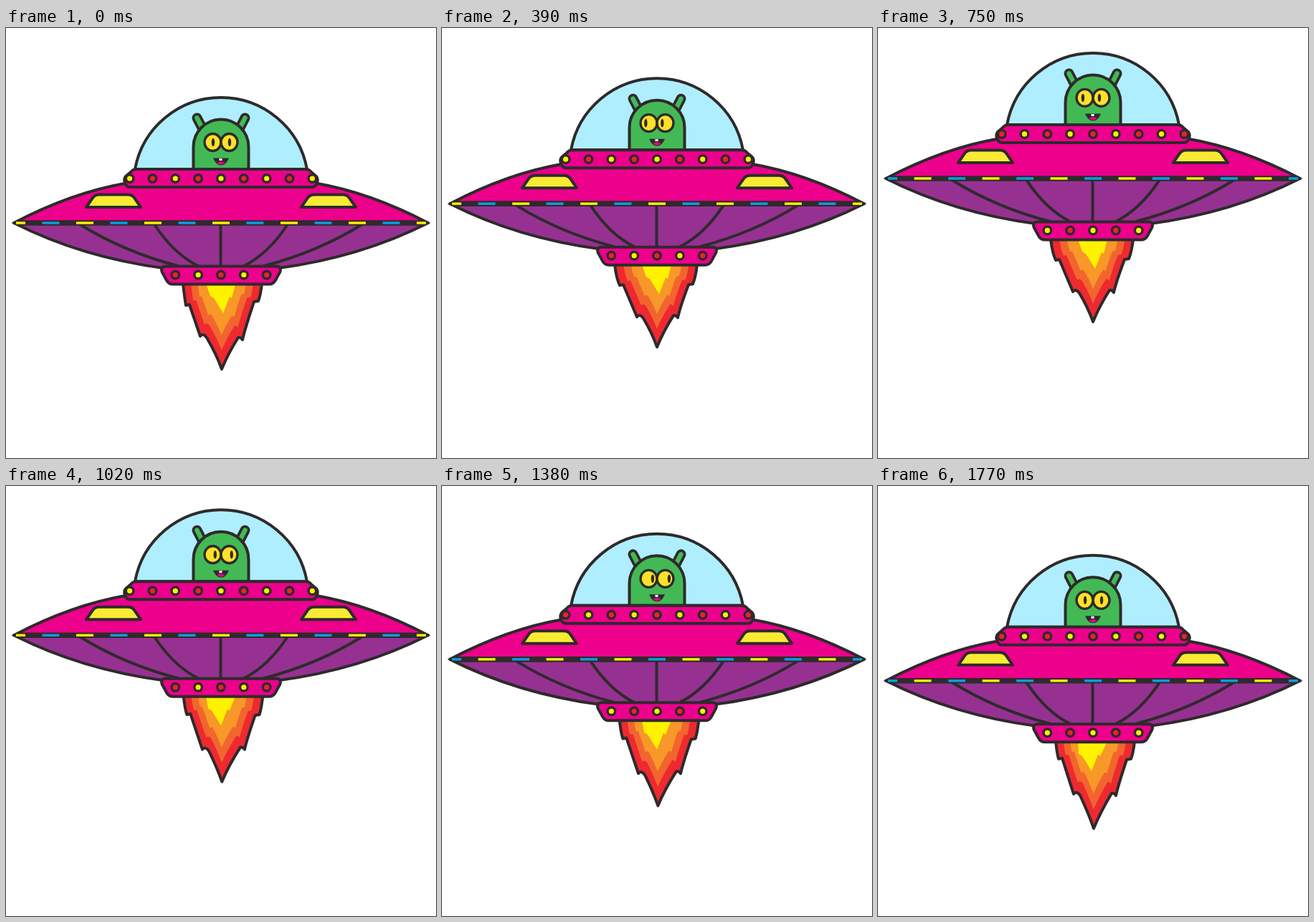
Animation of 600x600 px, one loop 1800 ms. Source, as an HTML page with a canvas:

```html
<!DOCTYPE html>
<html lang="en">
<head>
<meta charset="utf-8">
<title>Flying saucer</title>
<style>
html, body { margin: 0; width: 100%; height: 100%; overflow: hidden; background: #fff; }
canvas { display: block; width: 600px; height: 600px; }
</style>
</head>
<body>
<canvas id="stage" width="600" height="600"></canvas>
<script>
const ctx = document.getElementById('stage').getContext('2d');
const LOOP = 1800, STEP = 30, BLINK = 150, FLICKER = 360;
const INK = '#2e2a2b', PINK = '#ec008c', PURPLE = '#963192', GLASS = '#afeeff',
  GREEN = '#43b955', EYE = '#ffe029', PANE = '#f9eb33', YELLOW = '#fff200',
  RED = '#e9232b', BLUE = '#0a9fe3';

// at, left top, left barb, lower left barb, tip, lower right barb, right barb, right top, core tip
const FLAMES = [
  [0, 247, 251, 387, 271, 430, 301, 476, 330, 435, 352, 381, 357, 303],
  [30, 241, 248, 386, 272, 430, 300, 472, 329, 431, 350, 384, 356, 303],
  [90, 247, 252, 382, 276, 433, 302, 476, 334, 427, 355, 385, 359, 306],
  [150, 239, 245, 381, 277, 424, 301, 478, 330, 427, 352, 380, 356, 303],
  [240, 247, 253, 386, 276, 434, 302, 473, 335, 430, 355, 386, 359, 304],
  [330, 248, 252, 381, 273, 430, 301, 478, 332, 432, 353, 381, 358, 298]
];

const smooth = x => x * x * (3 - 2 * x);
const mix = (a, b, k) => a + (b - a) * k;

function paint(path, fill, width = 4) {
  if (fill) { ctx.fillStyle = fill; ctx.fill(path); }
  if (width) { ctx.lineWidth = width; ctx.strokeStyle = INK; ctx.stroke(path); }
}

function shape(d, fill, width) { paint(new Path2D(d), fill, width); }

function oval(x, y, rx, ry, fill, width) {
  const p = new Path2D();
  p.ellipse(x, y, rx, ry, 0, 0, Math.PI * 2);
  paint(p, fill, width);
}

function mirrored(draw) {
  draw();
  ctx.save();
  ctx.translate(600, 0);
  ctx.scale(-1, 1);
  draw();
  ctx.restore();
}

function flamePose(t) {
  const at = t % FLICKER;
  let i = FLAMES.length - 1;
  while (FLAMES[i][0] > at) i--;
  const a = FLAMES[i], b = FLAMES[(i + 1) % FLAMES.length];
  const end = b[0] || FLICKER;
  const k = (at - a[0]) / (end - a[0]);
  return a.slice(1).map((v, n) => mix(v, b[n + 1], k));
}

function flamePath(pose, w, h) {
  const [tl, lx, ly, mx, my, x, y, nx, ny, rx, ry, tr] = pose;
  const X = v => 300 + (v - 300) * w, Y = v => 357 + (v - 357) * h;
  const p = new Path2D();
  const line = (a, b) => p.lineTo(X(a), Y(b));
  const bend = (a, b, c, d) => p.quadraticCurveTo(X(a), Y(b), X(c), Y(d));
  p.moveTo(X(tl), Y(350));
  line(tl, 357);
  bend(tl + 2, 375, lx, ly);
  line(lx + 5, ly - 1);
  line(mx, my);
  bend(mx + 4, my - 5, mx + 9, my + 2);
  bend(x - 7, y - 20, x, y);
  bend(x + 9, y - 22, nx - 6, ny - 3);
  bend(nx - 3, ny - 4, nx, ny);
  bend(nx + 3, ny - 14, rx - 6, ry + 1);
  line(rx, ry);
  bend(tr - 2, 374, tr, 357);
  line(tr, 350);
  p.closePath();
  return p;
}

function flame(t) {
  const pose = flamePose(t), core = pose[12];
  paint(flamePath(pose, 1, 1), '#ee2930');
  paint(flamePath(pose, 0.79, 0.78), '#f2652f', 0);
  paint(flamePath(pose, 0.61, 0.6), '#f89828', 0);
  shape(`M279 350 V357 L${core - 18} 374 L${core - 13} 377 L${core} 398 ` +
    `L${core + 9} 375 L${core + 12} 377 L320 357 V350 Z`, YELLOW, 0);
}

// Look left, sweep right, return to the middle.
function gaze(t) {
  if (t < 525) return -5.6 * smooth(t / 525);
  if (t < 1260) return mix(-5.6, 5.6, smooth((t - 525) / 735));
  return 5.6 * (1 - smooth((t - 1260) / 540));
}

function alien(t) {
  mirrored(() => {
    for (const [width, color] of [[14, INK], [6.5, GREEN]]) {
      ctx.lineWidth = width;
      ctx.strokeStyle = color;
      ctx.stroke(new Path2D('M266.5 125.5 L275.5 143'));
    }
  });
  shape('M261.5 197 V166 A38.5 38.5 0 0 1 338.5 166 V197 Z', GREEN);
  const look = gaze(t);
  for (const x of [288.5, 311.5]) {
    oval(x, 159.5, 11.5, 12, EYE, 3.3);
    oval(x + 0.5 + look, 159.5, 2.2, 5.8, INK, 0);
  }
  shape('M289 181.5 H311 Q307 191.5 300 191.5 Q293 191.5 289 181.5 Z', INK, 0);
  shape('M294.5 188 Q300 184.5 305.5 188 Q300 193 294.5 188 Z', PINK, 0);
  shape('M297.5 182 H301.5 V185 H297.5 Z', '#fff', 0);
}

function lights(count, y, odd) {
  for (let i = 0; i < count; i++) {
    const x = 300 + (i - (count - 1) / 2) * 31.85;
    oval(x, y, 5.3, 5.3, (i + odd) % 2 ? RED : YELLOW, 3.4);
  }
}

function rim(odd) {
  shape('M7 272 L24 268.2 H576 L593 272 L576 275.8 H24 Z', INK, 0);
  for (let k = -6; k <= 6; k++) {
    const x = 300 + k * 47.5;
    const from = Math.max(x - 12, 14), to = Math.min(x + 12, 586);
    ctx.fillStyle = (k + 6 + odd) % 2 ? BLUE : YELLOW;
    ctx.fillRect(from, 270.3, to - from, 3.4);
  }
}

function hull() {
  shape('M11 272 Q106 320 220 335 H380 Q494 320 589 272 Z', PURPLE);
  mirrored(() => {
    shape('M103 274 Q164 312 240 332', null);
    shape('M207 274 Q234 315 268 332', null);
  });
  shape('M299.5 272 V334', null);
  shape('M11 272 Q92 229.5 168 216.5 H432 Q508 229.5 589 272 Z', PINK);
  mirrored(() => shape(
    'M112 250 L121 237 Q124 232.5 130 232.5 H170 Q176 232.5 179 237 L188 250 Z', PANE));
}

function draw(t) {
  const odd = Math.floor(t / BLINK) % 2;
  const rise = 67 * smooth(1 - Math.abs(t / 900 - 1));
  ctx.clearRect(0, 0, 600, 600);
  ctx.save();
  ctx.translate(0, -rise);
  ctx.lineJoin = ctx.lineCap = 'round';
  flame(t);
  shape('M180 197 A122 122 0 0 1 420 197 Z', GLASS);
  alien(t);
  hull();
  rim(odd);
  shape('M182 197 H418 Q423 197 426 201 L433 207 Q436 211 434 216 Q432 222 427 222 ' +
    'H173 Q168 222 166 216 Q164 211 167 207 L174 201 Q177 197 182 197 Z', PINK);
  lights(9, 210, odd);
  shape('M222 332.5 H378 Q384.5 333 382.5 340 L376 352 Q373 357.5 367 357.5 ' +
    'H233 Q227 357.5 224 352 L217.5 340 Q215.5 333 222 332.5 Z', PINK);
  lights(5, 344.5, 1 - odd);
  ctx.restore();
}

const start = performance.now();
function tick() {
  const t = (performance.now() - start) % LOOP;
  draw(Math.floor(t / STEP) * STEP);
  requestAnimationFrame(tick);
}
tick();
</script>
</body>
</html>
```
